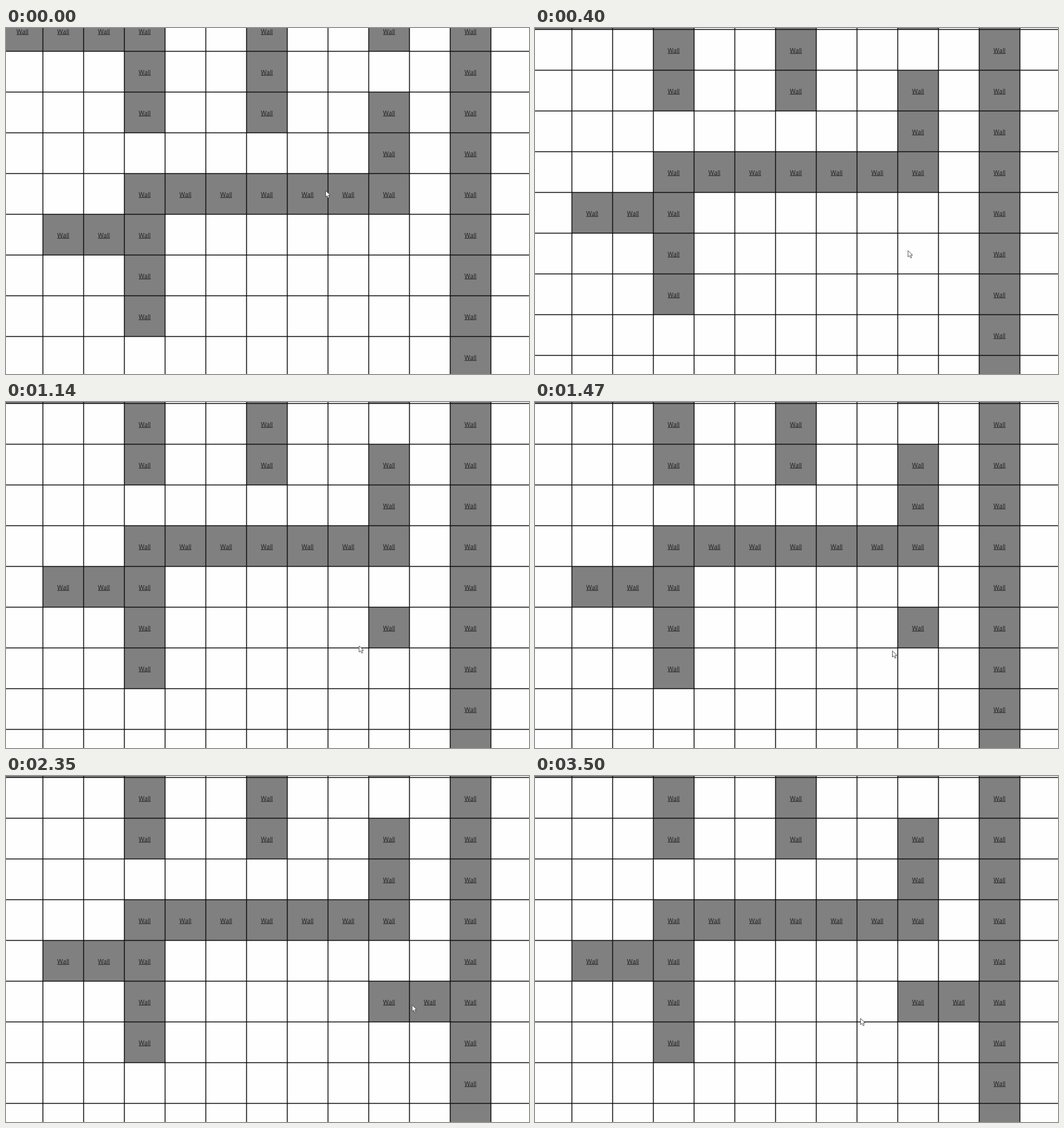
Write an HTML page that moves like this. It is 886 px wide and 586 px high and loops after 3560 ms.

```html
<!DOCTYPE html>
<html lang="en">
<head>
<meta charset="utf-8">
<title>Wall grid</title>
<style>
  html, body { margin: 0; width: 100%; height: 100%; overflow: hidden; background: #fefefe; }
  svg { display: block; width: 886px; height: 586px; }
  #walls rect { fill: #808080; }
  #walls text {
    font: 10.3px "Open Sans", "Noto Sans", sans-serif;
    fill: #1c1c1c; text-anchor: middle; text-decoration: underline;
  }
  #lines { stroke: #0c0c0c; stroke-width: 1.5; }
</style>
</head>
<body>
<svg viewBox="0 0 886 586">
  <g id="board"><g id="walls"></g><path id="lines"/></g>
  <path id="cursor" d="M0 0V10.6L2.5 8.4L4.4 12.4L6.2 11.6L4.5 7.7H7.8Z"
        fill="#fff" stroke="#444" stroke-width="0.9" stroke-linejoin="round"/>
</svg>
<script>
const LOOP = 3560, STEP = 67.35, LEAD = 12;
const CELL = 69, LEFT = -6.5, TOP = -29.5, SCROLL = 37;
const COLS = 13, ROWS = 10;
const $ = id => document.getElementById(id);
const colX = col => LEFT + col * CELL;
const rowY = row => TOP + row * CELL;

function add(parent, tag, attrs = {}, text = "") {
  const node = document.createElementNS("http://www.w3.org/2000/svg", tag);
  for (const key in attrs) node.setAttribute(key, attrs[key]);
  node.textContent = text;
  parent.append(node);
  return node;
}

function addWall(col, row) {
  const x = colX(col), y = rowY(row);
  const wall = add($("walls"), "g");
  add(wall, "rect", { x, y, width: CELL, height: CELL });
  add(wall, "text", { x: x + CELL / 2, y: y + 39 }, "Wall");
  return wall;
}

function across(row, from, to) {
  for (let col = from; col <= to; col++) addWall(col, row);
}
function down(col, from, to) {
  for (let row = from; row <= to; row++) addWall(col, row);
}

across(0, 0, 2);
down(3, 0, 2);
down(6, 0, 2);
down(9, 0, 0);
down(9, 2, 3);
across(4, 3, 9);
across(5, 1, 2);
down(3, 5, 7);
down(11, 0, ROWS - 1);

// Walls that the pointer places, with the tick of the click
const placed = [
  { tick: 11, node: addWall(9, 6) },
  { tick: 35, node: addWall(10, 6) }
];

let grid = "";
for (let col = 0; col <= COLS; col++) grid += `M${colX(col)} ${TOP}V${rowY(ROWS)}`;
for (let row = 0; row <= ROWS; row++) grid += `M${LEFT} ${rowY(row)}H${colX(COLS)}`;
$("lines").setAttribute("d", grid);

// Pointer moves, each easing out from where the last one ended
const home = [541.5, 275.5];
const moves = [
  { from: 1, to: 7, x: 634.5, y: 380 },
  { from: 13, to: 21, x: 586, y: 424 },
  { from: 21, to: 22, x: 605.5, y: 421.5 },
  { from: 22, to: 29, x: 701, y: 335 },
  { from: 30, to: 33, x: 688, y: 388 },
  { from: 35, to: 38, x: 684, y: 412 },
  { from: 40, to: 48, x: 585, y: 408 },
  { from: 49, to: 52, x: 551.5, y: 410.5 }
];

function pointerAt(tick) {
  return moves.reduce(([px, py], { from, to, x, y }) => {
    const p = Math.min(1, Math.max(0, (tick - from) / (to - from)));
    const eased = 1 - (1 - p) ** 2;
    return [px + (x - px) * eased, py + (y - py) * eased];
  }, home);
}

function render(time) {
  const tick = Math.floor((time % LOOP + LEAD) / STEP);
  $("board").setAttribute("transform", `translate(0 ${tick < 1 ? 0 : -SCROLL})`);
  for (const wall of placed) wall.node.style.display = tick < wall.tick ? "none" : "";
  $("cursor").setAttribute("transform", `translate(${pointerAt(tick)})`);
}

const start = performance.now();
function loop() {
  render(performance.now() - start);
  requestAnimationFrame(loop);
}
render(0);
requestAnimationFrame(loop);
</script>
</body>
</html>
```
